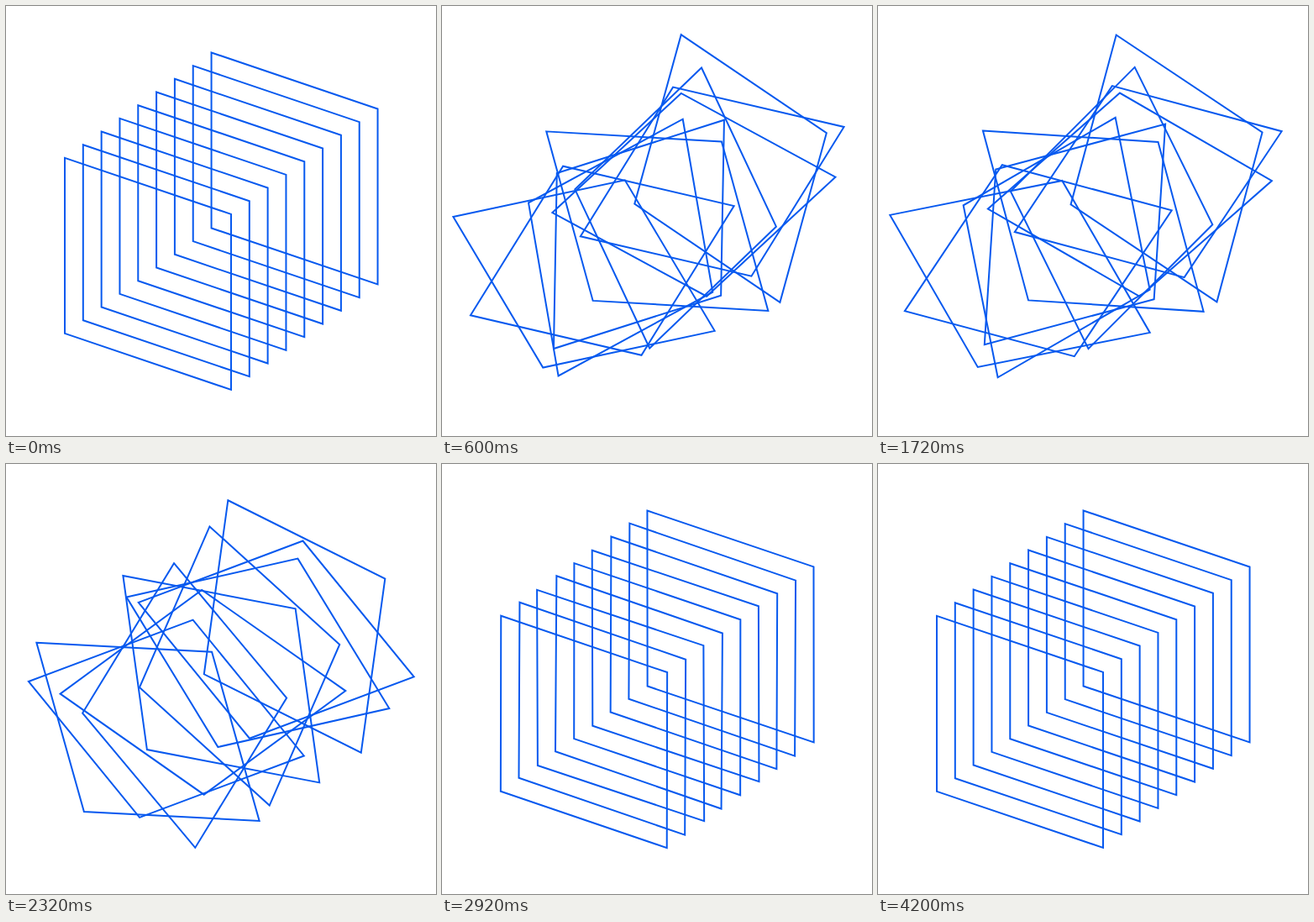
Animation of 512x512 px, one loop 4.3 s. Source, as an HTML page:

```html
<!DOCTYPE html>
<html lang="en">
<head>
<meta charset="utf-8">
<title>Turning rhombi</title>
<style>
  html, body { margin: 0; width: 100%; height: 100%; overflow: hidden; background: #fff; }
  svg { display: block; width: 100%; height: 100%; }
  path { fill: none; stroke: #0759ef; stroke-width: 2; }
</style>
</head>
<body>
<svg id="stage" viewBox="0 0 512 512"></svg>
<script>
  const LOOP = 4300;
  const OPEN_AT = 72;
  const CLOSE_AT = 2180;
  const TURNS = [-30, -75, 60, -105, -15, 45, -60, -75, 15];
  const FIRST = { x: 169, y: 318.9 };
  const STEP = { x: 21.82, y: -15.68 };
  const RHOMBUS = 'M-99-138L99-71V138L-99 71Z';

  const stage = document.getElementById('stage');
  const shapes = TURNS.map((turn, i) => {
    const node = document.createElementNS('http://www.w3.org/2000/svg', 'path');
    node.setAttribute('d', RHOMBUS);
    stage.append(node);
    return { node, turn, x: FIRST.x + STEP.x * i, y: FIRST.y + STEP.y * i };
  });

  // Damped spring from 0 to 1: mass 1, stiffness 100, damping 15.
  function spring(ms) {
    if (ms <= 0) return 0;
    const t = ms / 1000;
    const decay = 7.5;
    const freq = Math.sqrt(100 - decay * decay);
    const wave = Math.cos(freq * t) + decay / freq * Math.sin(freq * t);
    return 1 - Math.exp(-decay * t) * wave;
  }

  function draw(now) {
    const t = now % LOOP;
    const amount = spring(t - OPEN_AT) - spring(t - CLOSE_AT);
    for (const { node, turn, x, y } of shapes) {
      node.setAttribute('transform', `translate(${x} ${y}) rotate(${turn * amount})`);
    }
  }

  const start = performance.now();
  function tick() {
    draw(performance.now() - start);
    requestAnimationFrame(tick);
  }
  tick();
</script>
</body>
</html>
```
